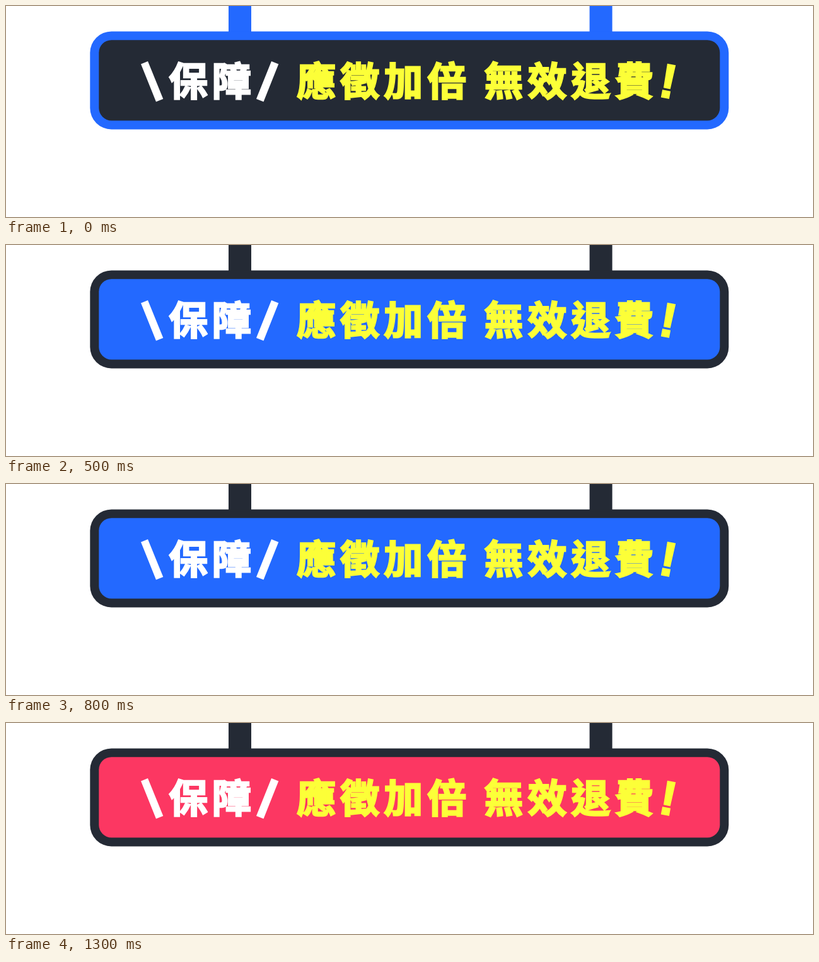
Write an HTML page with a canvas that moves like this. It is 1280 px wide and 336 px high and loops after 1.5 s.

```html
<!DOCTYPE html>
<html lang="zh-Hant">
<head>
<meta charset="utf-8">
<title>保障 應徵加倍 無效退費!</title>
<style>
  html, body { margin: 0; width: 100%; height: 100%; overflow: hidden; background: #fff; }
  canvas { display: block; }
</style>
</head>
<body>
<canvas id="stage" width="1280" height="336"></canvas>
<script>
const ctx = document.getElementById('stage').getContext('2d');
const STEP = 500;
const BLUE = '#2369ff', DARK = '#242a35', PINK = '#fc3762';
const WHITE = '#fff', YELLOW = '#fcff38';
const PHASES = [
  { frame: BLUE, panel: DARK },
  { frame: DARK, panel: BLUE },
  { frame: DARK, panel: PINK }
];
const PITCH = 69;

function roundBox(left, top, right, bottom, radius, color) {
  ctx.fillStyle = color;
  ctx.beginPath();
  ctx.roundRect(left, top, right - left, bottom - top, radius);
  ctx.fill();
}

function polygon(points, color) {
  ctx.fillStyle = color;
  ctx.beginPath();
  points.forEach(([x, y]) => ctx.lineTo(x, y));
  ctx.fill();
}

// The outline thickens the bold face into a heavy display weight
function heavyText(text, x, y, color, weight) {
  ctx.fillStyle = ctx.strokeStyle = color;
  ctx.lineWidth = weight;
  ctx.lineJoin = 'miter';
  ctx.miterLimit = 3;
  ctx.textAlign = 'center';
  ctx.textBaseline = 'alphabetic';
  ctx.fillText(text, x, y);
  ctx.strokeText(text, x, y);
}

// x is the centre of the first character
function words(text, x, color) {
  ctx.font = '900 62px "Noto Sans CJK TC", "Noto Sans CJK", sans-serif';
  [...text].forEach((char, i) => heavyText(char, x + i * PITCH, 142.5, color, 2.6));
}

function exclamation() {
  ctx.save();
  ctx.translate(1045.6, 145.6);
  ctx.rotate(0.187);
  ctx.font = 'bold 76px "Liberation Sans", Arial, sans-serif';
  heavyText('!', 0, 0, YELLOW, 2.6);
  ctx.restore();
}

function draw(time) {
  const { frame, panel } = PHASES[Math.floor(time / STEP) % PHASES.length];
  ctx.fillStyle = WHITE;
  ctx.fillRect(0, 0, 1280, 336);

  ctx.fillStyle = frame;
  ctx.fillRect(353, 0, 36, 48);
  ctx.fillRect(925.6, 0, 36, 48);
  roundBox(133.3, 40.5, 1146.3, 196.4, 34, frame);
  roundBox(147.3, 54.2, 1132.3, 182.4, 20, panel);

  polygon([[214, 92.5], [225, 88], [249.3, 148], [238, 152.5]], WHITE);
  polygon([[421, 88], [432.3, 92.5], [408.5, 152.5], [397, 148]], WHITE);
  words('保障', 289.3, WHITE);
  words('應徵加倍', 492.3, YELLOW);
  words('無效退費', 789.6, YELLOW);
  exclamation();
}

function tick() {
  draw(performance.now() - start);
  requestAnimationFrame(tick);
}

const start = performance.now();
tick();
</script>
</body>
</html>
```
